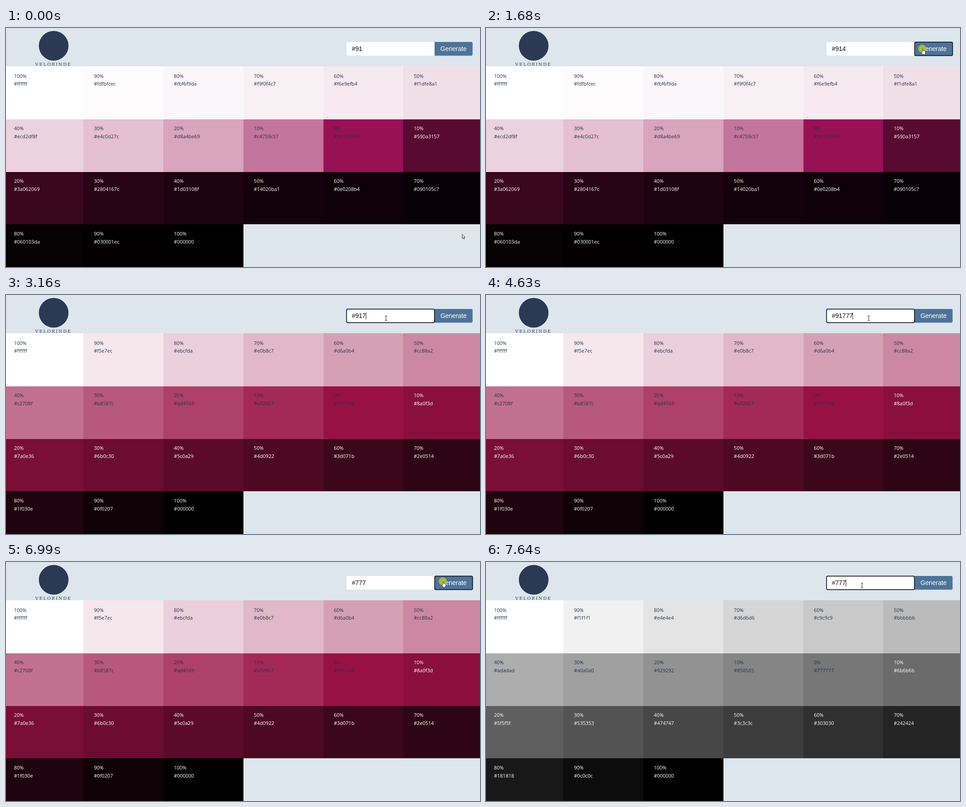
Recreate the animation shown at these times as an HTML page. Size 1054x531 px, loop 8 s.

```html
<!DOCTYPE html>
<html lang="en">
<head>
<meta charset="utf-8">
<title>Palette generator</title>
<style>
  html, body { margin: 0; width: 100%; height: 100%; overflow: hidden; background: #dde6ed; }
  svg { display: block; width: 1054px; height: 531px; }
  .label { font: 11px "Open Sans", "Noto Sans", sans-serif; }
  .form { font: 14px "Liberation Sans", Arial, sans-serif; }
  .brand { font: 9.8px "DejaVu Serif", serif; letter-spacing: 1.9px; }
  .ring { fill: none; stroke: #10151c; stroke-width: 1.7; }
</style>
</head>
<body>
<svg viewBox="0 0 1054 531">
  <rect width="1054" height="531" fill="#dde6ed"/>
  <circle cx="106" cy="39.5" r="33" fill="#2b3a54"/>
  <text class="brand" x="65" y="84" fill="#2b3a54">VELORINDE</text>
  <g id="grid"></g>
  <path d="M953 31H760q-3 0-3 3v24.500q0 3 3 3H953z" fill="#fff"/>
  <path d="M953 31h81.500q3 0 3 3v24.500q0 3-3 3H953z" fill="#4e7399"/>
  <text class="form" x="769" y="51" id="value" fill="#111"></text>
  <text class="form" x="966" y="51" fill="#fff">Generate</text>
  <rect id="caret" y="39" width="1" height="15" fill="#111"/>
  <rect id="inputRing" class="ring" x="757.300" y="31.300" width="195.400" height="30" rx="2.500"/>
  <rect id="buttonRing" class="ring" x="953.300" y="31.300" width="84.200" height="30" rx="2.500"/>
  <g id="pointer">
    <circle id="press" r="9" fill="#b2be32" opacity=".88"/>
    <path id="arrow" d="M.5 .5V9.500L2.600 7.600L4.200 11L5.700 10.300L4.200 7H7z" fill="#fff" stroke="#111" stroke-width=".9"/>
    <path id="beam" d="M-2.500-5H-.6L0-4.500L.6-5H2.500M0-4.500V4.500M-2.500 5H-.6L0 4.500L.6 5H2.500" fill="none" stroke="#222" stroke-width="1"/>
    <path id="hand" d="M0 1Q1-.3 2 1V5Q3 4 4 5.200Q5 4.500 5.600 5.700Q7 5.200 7 7V9.500L6 13H1L-2 8.500Q-2 7 0 8z" fill="#fff" stroke="#222" stroke-width=".8"/>
  </g>
</svg>
<script>
const LOOP = 8000;
const NAVY = '#27324d';
const $ = id => document.getElementById(id);
const show = (id, on) => $(id).setAttribute('visibility', on ? 'visible' : 'hidden');

// [time, base colour]
const palettes = [[0, '99115544'], [1760, '991144'], [7090, '777777']];

// [time, field text, caret shown]
const typing = [
  [0, '#91', 0], [840, '#91', 1], [1000, '#914', 1], [1600, '#914', 0],
  [2230, '#914', 1], [2780, '#91', 0], [3160, '#917', 1], [3240, '#9177', 1],
  [3390, '#91777', 1], [3780, '#91777', 0], [4570, '#91777', 1],
  [5110, '#9177', 0], [5260, '#917', 0], [5410, '#91', 0], [5590, '#9', 0],
  [5660, '#9', 1], [5830, '#', 1], [6150, '#', 0], [6300, '#7', 1],
  [6450, '#77', 1], [6530, '#777', 1], [6990, '#777', 0], [7540, '#777', 1]
];

const focus = [
  [0, ''], [840, 'input'], [1600, 'button'], [2230, 'input'], [3780, 'button'],
  [4570, 'input'], [6990, 'button'], [7540, 'input']
];

const presses = [[840, 920], [1600, 1760], [2230, 2380], [3780, 3940],
  [4570, 4630], [6990, 7090], [7540, 7640]];

// [first step, last step, step count, x, y]
const moves = [
  [70, 210, 3, 836, 0], [360, 520, 3, 822, 35], [670, 670, 1, 821, 37],
  [1080, 1520, 6, 970, 46], [1840, 2080, 4, 845, 51.500],
  [3550, 3780, 4, 971, 45], [3940, 4170, 4, 859, 51], [4250, 4330, 2, 851, 51.500],
  [6610, 6840, 4, 971, 46], [6990, 6990, 1, 971, 43], [7160, 7390, 4, 836, 52]
];

const latest = (track, t) => track.filter(k => k[0] <= t).pop();

function pointerAt(t) {
  let x = 1014, y = 458;
  for (const [start, end, count, toX, toY] of moves) {
    if (t < start) break;
    const gap = (end - start) / (count - 1) || 1;
    const part = Math.min(count, Math.floor((t - start) / gap + 1e-6) + 1) / count;
    x += (toX - x) * part;
    y += (toY - y) * part;
  }
  return [x, y];
}

// Alpha-weighted mix of a base colour with an opaque grey level.
function mix(base, level, percent) {
  const [r, g, b, a = 255] = base.match(/../g).map(h => parseInt(h, 16));
  const p = percent / 100, w = 2 * p - 1, diff = 1 - a / 255;
  const weight = w * diff === -1 ? p : ((w + diff) / (1 + w * diff) + 1) / 2;
  const channels = [r, g, b].map(c => Math.round(c + (level - c) * weight + 1e-6));
  const alpha = Math.round(a + (255 - a) * p - 0.01);
  if (alpha < 255) channels.push(alpha);
  return '#' + channels.map(c => c.toString(16).padStart(2, '0')).join('');
}

const rowTops = [85, 203, 320, 436, 553];
const columnEdge = i => Math.round(177.8 * i - 5.7);

function add(name, attrs, text = '') {
  const el = document.createElementNS('http://www.w3.org/2000/svg', name);
  for (const key in attrs) el.setAttribute(key, attrs[key]);
  el.textContent = text;
  $('grid').append(el);
  return el;
}

const cells = Array.from({ length: 21 }, (_, i) => {
  const col = i % 6, row = Math.floor(i / 6), dark = i > 10;
  const percent = Math.abs(10 - i) * 10;
  const left = columnEdge(col), top = rowTops[row];
  const x = 17.7 + 177.8 * col, y = 110.5 + 116.9 * row;
  const style = { class: 'label', x, fill: dark ? '#fff' : NAVY };
  const box = add('rect', { x: left, y: top, width: columnEdge(col + 1) - left, height: rowTops[row + 1] - top });
  add('text', { ...style, y }, percent + '%');
  const code = add('text', { ...style, y: y + 17.5 });
  return { box, code, percent, level: dark ? 0 : 255 };
});

let shownBase;
function paintPalette(base) {
  if (base === shownBase) return;
  shownBase = base;
  for (const { box, code, percent, level } of cells) {
    const colour = mix(base, level, percent);
    box.setAttribute('fill', colour.slice(0, 7));
    code.textContent = colour;
  }
}

function render(t) {
  paintPalette(latest(palettes, t)[1]);

  const [, text, caret] = latest(typing, t);
  $('value').textContent = text;
  $('caret').setAttribute('x', Math.floor(769 + text.length * 7.786));
  show('caret', caret);

  const focused = latest(focus, t)[1];
  show('inputRing', focused === 'input');
  show('buttonRing', focused === 'button');

  const [x, y] = pointerAt(t);
  const inForm = y > 30 && y < 62 && x > 757 && x < 1038;
  $('pointer').setAttribute('transform', `translate(${x} ${y})`);
  show('arrow', !inForm);
  show('beam', inForm && x < 953);
  show('hand', inForm && x >= 953);
  show('press', presses.some(([from, to]) => t >= from && t < to));
}

const begin = performance.now();
function tick() {
  render((performance.now() - begin) % LOOP);
  requestAnimationFrame(tick);
}
tick();
</script>
</body>
</html>
```
